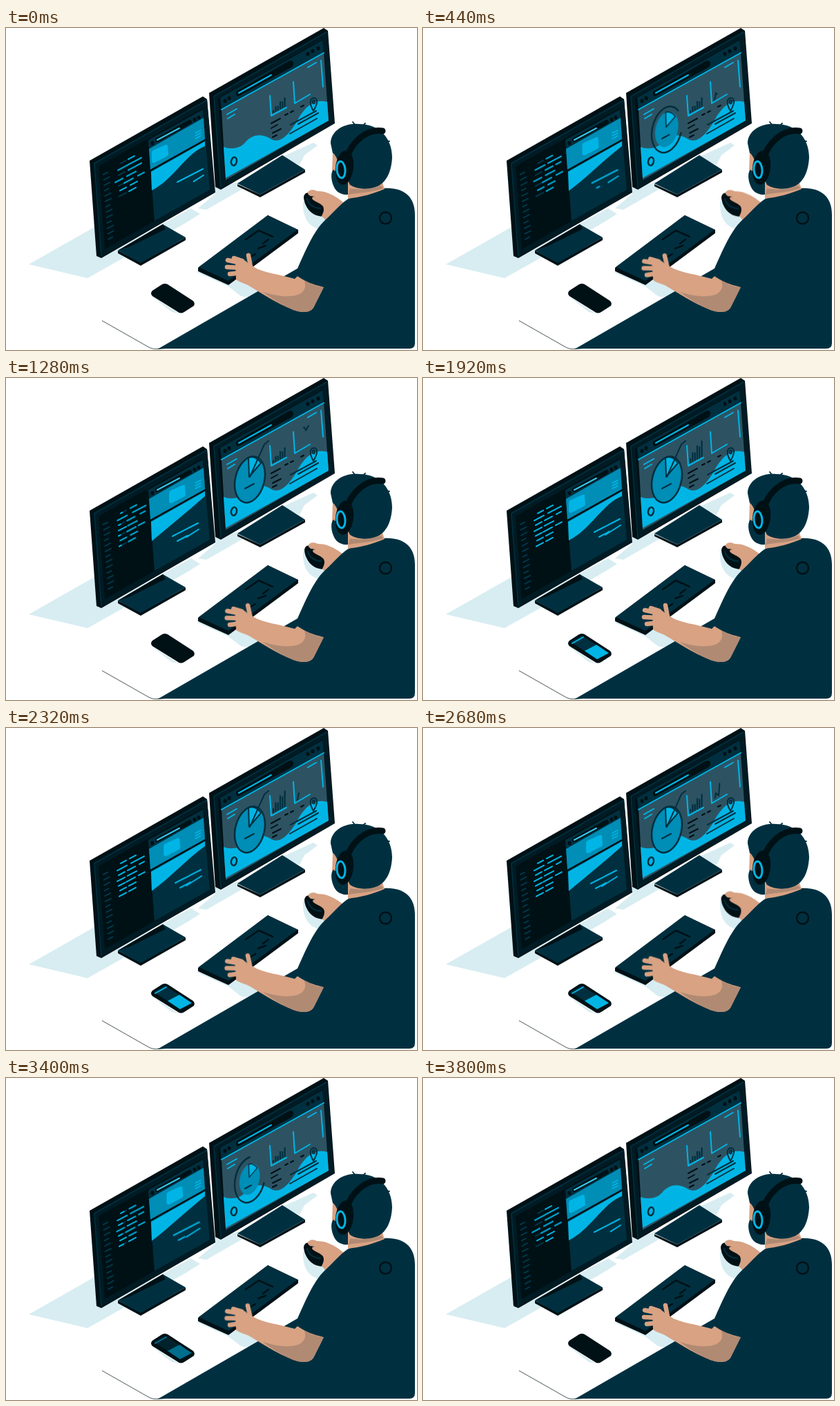
An HTML page that plays this animation: 595 by 466 pixels, repeating every 3840 ms.

```html
<!DOCTYPE html>
<html lang="en">
<head>
<meta charset="utf-8">
<title>Developer at a desk</title>
<style>
html, body { margin: 0; width: 100%; height: 100%; overflow: hidden; background: #fff; }
svg { display: block; width: 595px; height: 466px; }
.navy { fill: #003040; }
.black { fill: #001116; }
.bezel { fill: #001b24; }
.cyan { fill: #00b5e5; }
.blue { fill: #008db6; }
.slate { fill: #2d5363; }
.pale { fill: #d7edf2; }
.skin { fill: #d8a283; }
.shade { fill: #b18a73; }
.line { fill: none; stroke-linecap: round; stroke-linejoin: round; }
.lc { stroke: #00b5e5; }
.ln { stroke: #003040; }
.lb { stroke: #001116; }
.ld { stroke: #00384a; }
.ls { stroke: #d8a283; }
.anim { animation: 3840ms linear infinite; }
.half { animation: 1920ms ease-in-out infinite; }

.tab { animation-name: tab; }
@keyframes tab {
  0% { transform: none; }
  34%, 70% { transform: translate(25px, -14px); }
  97%, 100% { transform: none; }
}
.hill { animation-name: hill; }
@keyframes hill {
  0%, 97%, 100% { d: path("M210 208L288 164V171C261 181 242 220 211 235Z"); }
  35%, 70% { d: path("M210 208L288 164V171C262 194 236 215 211 236Z"); }
}
.copy { animation-name: copy; }
@keyframes copy {
  0%, 97%, 100% { transform: none; }
  38% { transform: translate(-5px, 2px); }
  67% { transform: translate(-7px, 6px); }
}
.draw { stroke-dasharray: 1 2; stroke-dashoffset: 1; }
.extra { animation-name: extra; }
@keyframes extra {
  0%, 8% { stroke-dashoffset: 1; visibility: hidden; }
  8.1% { visibility: visible; }
  22%, 84% { stroke-dashoffset: 0; }
  96% { stroke-dashoffset: 1; visibility: visible; }
  96.1%, 100% { stroke-dashoffset: 1; visibility: hidden; }
}
.grow { animation-name: grow; }
@keyframes grow {
  0%, 25%, 98%, 100% { stroke-dashoffset: .35; }
  45%, 84% { stroke-dashoffset: 0; }
}
.trace { stroke-dasharray: .55 3; animation: trace 1920ms linear infinite; }
@keyframes trace {
  0%, 12% { stroke-dashoffset: .57; }
  46% { stroke-dashoffset: -.19; }
  58% { stroke-dashoffset: -.43; }
  75%, 100% { stroke-dashoffset: -1.05; }
}
.ring { animation-name: ring; }
@keyframes ring {
  0%, 1% { stroke-dashoffset: 1; visibility: hidden; }
  1.1% { visibility: visible; }
  14%, 85% { stroke-dashoffset: 0; }
  97% { stroke-dashoffset: 1; visibility: visible; }
  97.1%, 100% { stroke-dashoffset: 1; visibility: hidden; }
}
.slice { transform-origin: 352px 145px; animation-name: slice; }
@keyframes slice {
  0%, 3% { transform: scale(0); }
  14%, 85% { transform: none; }
  96%, 100% { transform: scale(0); }
}
.lead { animation-name: lead; }
@keyframes lead {
  0%, 14% { stroke-dashoffset: 1; visibility: hidden; }
  14.1% { visibility: visible; }
  23% { stroke-dashoffset: .14; }
  31%, 70% { stroke-dashoffset: 0; }
  79% { stroke-dashoffset: .52; }
  86% { stroke-dashoffset: 1; visibility: visible; }
  86.1%, 100% { stroke-dashoffset: 1; visibility: hidden; }
}
.bar { transform-box: fill-box; transform-origin: bottom; animation-name: bar; }
@keyframes bar {
  0%, 34% { transform: none; }
  49%, 61% { transform: scaleY(1.7); }
  79%, 100% { transform: none; }
}
.lit { animation-name: lit; }
@keyframes lit {
  0%, 40% { opacity: 0; }
  49%, 86% { opacity: 1; }
  92%, 100% { opacity: 0; }
}
.mouse { animation-name: mouse; }
@keyframes mouse {
  0%, 8% { transform: none; }
  22%, 25% { transform: translate(4px, 1px); }
  33%, 63% { transform: translate(1px, 4px); }
  78%, 100% { transform: none; }
}
.type { transform-origin: 362px 358px; animation: type 480ms ease-in-out infinite alternate; }
@keyframes type { from { transform: none; } to { transform: rotate(-2.2deg); } }
.row { animation-name: row; }
@keyframes row {
  0%, 3% { transform: var(--a); }
  20%, 25% { transform: var(--b); }
  35%, 42% { transform: var(--c); }
  50%, 86% { transform: none; }
  98%, 100% { transform: var(--a); }
}
.late { animation-name: late; }
@keyframes late {
  0%, 28% { stroke-dashoffset: 1; visibility: hidden; }
  28.1% { visibility: visible; }
  46%, 84% { stroke-dashoffset: 0; }
  96% { stroke-dashoffset: 1; visibility: visible; }
  96.1%, 100% { stroke-dashoffset: 1; visibility: hidden; }
}
</style>
</head>
<body>
<svg viewBox="0 0 595 466" stroke-width="2">
  <!-- shadows -->
  <g class="pale">
    <path d="M33 342L130 287L140 328L215 290L268 261L281 269L262 281L118 362Z"/>
    <path d="M278 261L303 240V231L340 222L346 231L290 263Z"/>
    <path d="M398 187L445 166L451 170L432 184L425 198Z"/>
    <path d="M430 250C429 272 436 290 460 292L468 278Z"/>
    <path d="M275 353L322 374L340 388C352 392 362 386 366 379L345 362Z"/>
    <path d="M208 386L250 413L240 411Z"/>
  </g>

  <!-- desk edge -->
  <path d="M139 423.500L205 461Q213 466 222 464" fill="none" stroke="#001116" stroke-width=".7"/>

  <!-- left monitor -->
  <path class="black" d="M162 322L195 339L260 303V307L195 344L162 326Z"/>
  <path class="navy" d="M162 322L227 284L260 303L195 340Z"/>
  <path class="black" d="M162 322L227 284L231 291L180 316Z"/>
  <path class="black" d="M121 192L285 99L291 103L303 238L138 333L131 330Z"/>
  <path class="bezel" d="M127 195L291 103L302 238L138 331Z"/>
  <path class="line ln" d="M138 330L128 196L290 105" stroke-width="1.500"/>
  <path class="black" d="M134 200L285 116L295 234L143 320Z"/>
  <path class="navy" d="M206 162L285 118L295 234L215 279Z"/>
  <path class="blue" d="M207 175L286 130L288 161L209 205Z"/>
  <path class="line lb" d="M209 206L288 162"/>
  <path class="half tab cyan" d="M213 177L231 169Q234 168 234 171L235 182Q235 185 232 186L215 195Q212 196 211 193V181Q211 178 213 177Z"/>
  <path class="line lc" d="M274 152L282 148M274 156L282 152M274 160L282 156" stroke-width="1.500"/>
  <path class="half hill cyan" d="M210 208L288 164V171C261 181 242 220 211 235Z"/>
  <path class="line lb" d="M219 162L266 136" stroke-width="6"/>
  <path class="line" d="M219 162L251 145" stroke="#36c5ea"/>
  <path class="line lb" d="M212 167V166M273 133V132M279 130V129" stroke-width="5"/>
  <g class="half copy line lc">
    <path d="M248 223L285 204"/>
    <path class="anim draw grow" pathLength="1" d="M286 213L264 227"/>
    <path class="anim draw extra" pathLength="1" d="M255 230L270 222"/>
  </g>
  <g id="gutter" class="line ld"></g>
  <g id="code" class="line lc"></g>

  <!-- right monitor -->
  <path class="black" d="M335 226L368 241L433 205V209L368 245L335 229Z"/>
  <path class="navy" d="M335 225L400 184L433 205L368 241Z"/>
  <path class="black" d="M294 94L460 0L466 4L476 138L311 234L303 230Z"/>
  <path class="bezel" d="M300 98L465 4L475 138L311 232Z"/>
  <path class="line ln" d="M311 231L301 99L464 6" stroke-width="1.500"/>
  <path class="black" d="M307 102L458 17L468 134L317 220Z"/>
  <path class="navy" d="M310 101L458 18L460 36L312 118Z"/>
  <path class="black" d="M333 92L409 48Q415 46 416 50T413 57L336 99Q332 98 333 92Z"/>
  <path class="line lc" d="M337 94L384 68"/>
  <path class="line lb" d="M317 106V105M323 102V101M437 38V37M444 34V33M452 30V29" stroke-width="5"/>
  <path class="slate" d="M312 118L460 36L467 134L318 220Z"/>
  <path class="cyan" d="M315 172C324 176 338 175 346 166C358 151 374 154 384 161C398 168 410 153 420 137C433 113 446 102 465 107L467 134L318 217Z"/>
  <path class="line lc" d="M312 118L460 36"/>
  <path class="line lc" d="M320 125L334 117M321 131L331 125M382 98L384 127L406 115M416 78L418 109L440 96M456 47L459 85M437 57L449 50"/>
  <path class="line lb" d="M384 138L397 131M384 145L393 140M386 152L398 146M386 158L392 155M404 126L408 124M412 122L416 120M427 114L431 112"/>
  <path class="line ln" d="M412 140L449 120M411 153L450 131M423 139L452 123"/>
  <path class="line ln" d="M445 120C441 113 440 109 441 105C443 100 449 100 450 105C451 110 448 115 445 120Z"/>
  <ellipse class="line ln" cx="445.500" cy="107" rx="1.500" ry="2.500"/>
  <ellipse class="line ln" cx="330" cy="193" rx="4" ry="6" transform="rotate(12 330 193)" stroke-width="2.500"/>
  <g id="bars"></g>
  <path class="line ln trace" pathLength="1" d="M422 104L424 94L428 98L430 73Q432 69 434 76L438 69"/>

  <!-- pie chart -->
  <g class="anim slice">
    <ellipse class="blue" cx="353" cy="147" rx="21" ry="34" transform="rotate(14 353 147)"/>
    <path class="cyan ln" d="M352 143L351 115Q361 112 369 123Z" stroke-linejoin="round"/>
  </g>
  <ellipse class="anim line ln draw ring" pathLength="1" cx="353" cy="147" rx="21" ry="34" transform="rotate(14 353 147)" stroke-width="2.500"/>
  <path class="anim line ln draw lead" pathLength="1" d="M353 143L374 96L380 91"/>
  <path class="anim line ln draw ring" pathLength="1" d="M346 160L359 153"/>

  <!-- keyboard -->
  <path class="black" d="M278 347L379 271L423 292V297L322 372L278 352Z"/>
  <path class="navy" d="M279 346L379 271L422 292L322 366Z"/>
  <path class="line lb" d="M347 306L366 293L386 302M380 306L372 312M376 315L365 319M361 327L351 333" stroke-width="2.500"/>

  <!-- phone -->
  <path class="black" d="M212 380L226 371Q230 369 234 371L271 395Q274 398 272 402L258 411Q253 414 249 411L212 388Q208 384 212 380Z"/>
  <g class="anim lit">
    <path class="navy" d="M214 382L230 373L269 398L252 407Z"/>
    <path class="cyan" d="M234 395L251 386L269 398L252 407Z"/>
    <path class="line lc" d="M216 384L232 375"/>
  </g>

  <!-- mouse and right hand -->
  <g class="anim mouse">
    <path class="black" d="M431 245C432 236 442 237 448 243L460 255C468 266 462 275 453 272C441 270 432 258 431 245Z"/>
    <path class="line ln" d="M436 247C438 255 444 260 455 261"/>
    <path class="skin" d="M437 240C436 234 445 233 450 236C463 236 472 241 480 246L492 255L464 280L457 272C459 268 462 262 458 257C454 253 449 252 445 249C441 246 444 244 447 244L440 243Z"/>
  </g>

  <!-- body -->
  <path class="navy" d="M219 465L422 348C433 324 445 294 462 278C475 266 487 251 498 246L546 232C576 230 592 244 592 270V456Q592 464 584 464H232Z"/>
  <circle class="line lb" cx="549.500" cy="275" r="8.500" stroke-width="2.500"/>

  <!-- left arm -->
  <path class="skin" d="M356 345C374 355 395 356 418 363L424 357L460 375L446 403C442 412 430 413 416 408C391 398 368 383 345 369Z"/>
  <path class="shade" d="M372 382C390 388 412 391 425 385C436 379 434 369 430 362Q442 374 460 375L446 403C442 412 430 413 416 408C400 401 385 392 372 382Z"/>
  <path class="navy" d="M420 358L432 327L468 340L460 375Q439 371 420 358Z"/>
  <g class="type">
    <path class="line ls" d="M321 336L340 340M320 346L340 347M324 356L342 354M330 333L342 337M351 329L354 345" stroke-width="6.500"/>
    <path class="skin" d="M332 338Q342 331 350 340L361 347L371 356L357 375C349 370 341 370 333 364Z"/>
  </g>

  <!-- head -->
  <path class="skin" d="M473 180L472 209L495 225V247C513 245 532 240 548 233L544 221L510 180Z"/>
  <path class="shade" d="M498 232C513 235 530 233 543 228L546 232C530 238 512 238 496 241Z"/>
  <path class="navy" d="M470 167C470 148 491 137 511 139C540 139 559 159 559 187C558 210 549 227 532 231C520 234 507 233 498 227L479 189Q475 181 473 181Z"/>
  <path class="navy" d="M474 205C468 211 472 230 480 237Q487 242 495 241V222Z"/>
  <path class="line ln" d="M506 141L502 136M517 141L520 138M547 163L555 164" stroke-width="1.800"/>
  <path class="line lb" d="M494 188C498 169 520 145 545 149" stroke-width="9"/>
  <ellipse class="black" cx="490" cy="202" rx="13" ry="25" transform="rotate(7 490 202)"/>
  <ellipse class="line lc" cx="485" cy="205" rx="6" ry="12" transform="rotate(-5 485 205)" stroke-width="3"/>
</svg>

<script>
const add = (parent, tag, attrs) => {
  const el = document.createElementNS('http://www.w3.org/2000/svg', tag);
  for (const key in attrs) el.setAttribute(key, attrs[key]);
  document.getElementById(parent).append(el);
  return el;
};
const slope = -0.53;
const dash = (x, y, len) => `M${x} ${y}l${len} ${len * slope}`;
const slide = x => `translate(${x}px, ${x * slope}px)`;

for (let i = 0; i < 13; i++) {
  add('gutter', 'path', { d: dash(141 + i * 0.6, 212 + i * 7.8, i % 3 ? 8 : 6) });
}

// Each row holds pairs of start and length.
const rows = [
  [166, 8, 179, 9],
  [161, 14, 181, 19],
  [163, 9, 176, 11, 193, 7],
  [161, 11, 176, 13],
  [163, 9, 174, 13, 192, 9],
  [165, 9, 178, 10],
  [164, 10, 178, 10]
];
rows.forEach((row, r) => {
  const y = 199 + r * 7.8;
  for (let i = 0; i < row.length; i += 2) {
    const x = row[i], late = i === 0 && r % 2 === 0;
    const d = dash(x, y + (x - 160) * slope, row[i + 1]);
    if (late) add('code', 'path', { d, class: 'ld' });
    const el = add('code', 'path', { d, class: late ? 'anim draw late' : 'anim row' });
    if (late) el.setAttribute('pathLength', 1);
    el.style.setProperty('--a', slide((r * 5 + i) % 7 - 4));
    el.style.setProperty('--b', slide((r * 3 + i) % 6 - 1));
    el.style.setProperty('--c', slide((r + i) % 4 - 1));
  }
});

[4, 8, 7, 12, 10, 14].forEach((h, i) => {
  const x = 386 + i * 3.3;
  add('bars', 'rect', { class: 'anim bar navy', x, y: 123 - i * 1.7 - h, width: 2.2, height: h });
});
</script>
</body>
</html>
```
